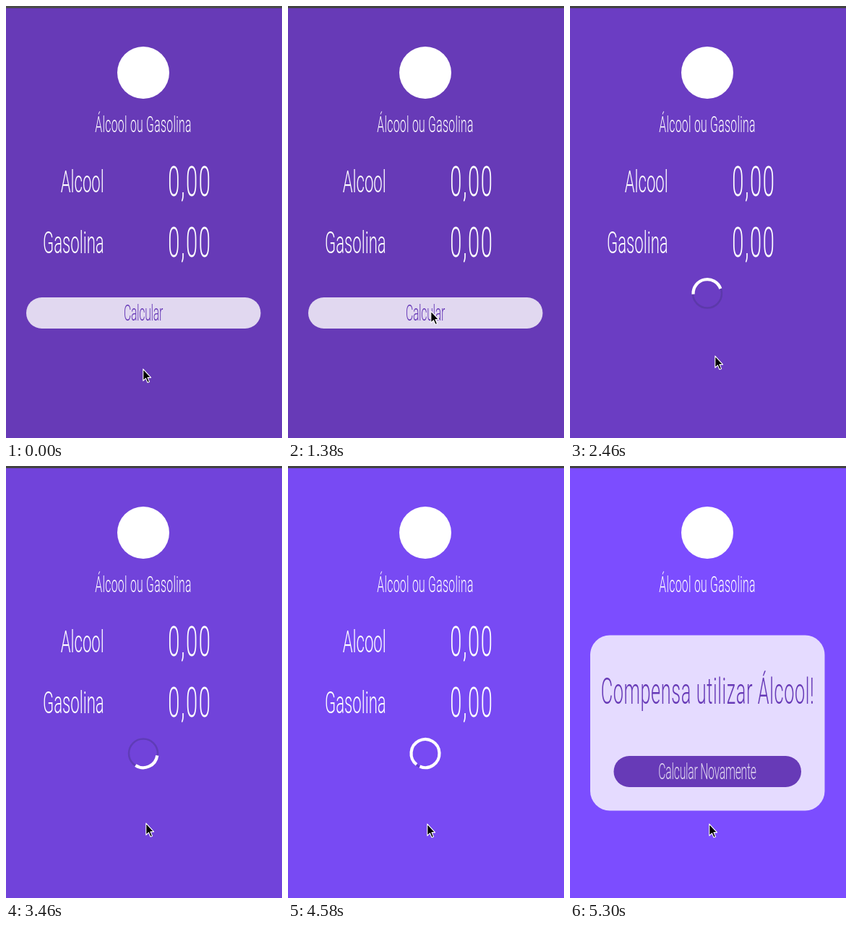
Animation, 382 px wide and 596 px high, one loop 8 s. Source, as an HTML page:

```html
<!DOCTYPE html>
<html lang="pt-BR">
<head>
<meta charset="utf-8">
<title>Álcool ou Gasolina</title>
<style>
  html, body { margin: 0; width: 100%; height: 100%; overflow: hidden; background: #673ab7; }
  svg { display: block; width: 382px; height: 596px; }
  text { font-family: Roboto, "Liberation Sans", sans-serif; font-weight: 300; fill: #fff; }
  .middle { text-anchor: middle; }
  .end { text-anchor: end; }
  .caption { font-size: 31px; letter-spacing: .55px; }
  .label { font-size: 43.4px; }
  .value { font-size: 57px; letter-spacing: 3px; }
  .heading { font-size: 49.6px; letter-spacing: 1.2px; }
  .button { font-size: 31px; letter-spacing: -.55px; }
  .purple { fill: #673ab7; }
  .veil { fill: #fff; fill-opacity: .8; }
</style>
</head>
<body>
<svg viewBox="0 0 382 596">
  <rect id="back" width="382" height="596"/>
  <rect width="382" height="3" fill="#424242"/>
  <path id="dots" d="M0 1.5H382" stroke="#666" stroke-dasharray="1 1"/>

  <circle cx="190" cy="92" r="36" fill="#fff"/>
  <g id="header"></g>

  <g id="form"></g>
  <g id="submit">
    <rect class="veil" x="28" y="402" width="324.5" height="43" rx="21.5"/>
  </g>

  <g id="spinner" fill="none" transform="translate(190 396.6)">
    <circle r="20" stroke="#4a348c" stroke-opacity=".45" stroke-width="2.5"/>
    <path id="arc" stroke="#fff" stroke-width="4.2"/>
  </g>

  <g id="result">
    <rect class="veil" x="28" y="233.5" width="324.5" height="242" rx="27"/>
    <rect class="purple" x="60.5" y="400" width="259.5" height="43" rx="21.5"/>
  </g>

  <path id="cursor" d="M.8 .9V17L4.5 13.6L7 19.5L9.5 18.4L7 12.6H11.6Z"
        fill="#000" stroke="#fff" stroke-width="1.1" stroke-linejoin="round"/>
</svg>

<script>
const LOOP = 8000;
const CLICK = 1780, ANSWER = 4720; // button pressed, result shown
const CONDENSE = 0.51; // one narrow face shared by all the text
const $ = id => document.getElementById(id);

function write(parent, text, style, x, y) {
  const el = document.createElementNS("http://www.w3.org/2000/svg", "text");
  el.setAttribute("class", style);
  el.setAttribute("transform", `translate(${x} ${y}) scale(${CONDENSE} 1)`);
  el.textContent = text;
  $(parent).append(el);
}

write("header", "Álcool ou Gasolina", "caption middle", 190, 173.7);
["Alcool", "Gasolina"].forEach((fuel, row) => {
  write("form", fuel, "label end", 135.7, 257 + 84 * row);
  write("form", "0,00", "value", 224.3, 261.5 + 84 * row);
});
write("submit", "Calcular", "button middle purple", 190, 433.5);
write("result", "Compensa utilizar Álcool!", "heading middle purple", 190.5, 327.5);
write("result", "Calcular Novamente", "button middle veil", 190, 431.5);

const mix = (a, b, k) => a + (b - a) * k;
const blend = (from, to, k) => from.map((v, i) => mix(v, to[i], k));
const progress = (t, begin, end) => Math.min(1, Math.max(0, (t - begin) / (end - begin)));
const easeOut = k => 1 - (1 - k) ** 2;

// Each move takes the value on from wherever the last one left it.
const follow = (start, moves, t) => moves.reduce(
  (value, { begin, end, to, ease = k => k }) => blend(value, to, ease(progress(t, begin, end))),
  start);

const pointerMoves = [
  { begin: 499, end: 500, to: [198, 449] },
  { begin: 900, end: 1240, to: [197, 420] },
  { begin: CLICK, end: 2200, to: [200, 482] },
  { begin: 2460, end: 3860, to: [192, 493], ease: easeOut },
];

// start angle and sweep, in degrees
const arcMoves = [
  { begin: CLICK, end: 2460, to: [177, 163] },
  { begin: 2460, end: 3460, to: [368, 115] },
  { begin: 3460, end: 4580, to: [488, 345] },
];

function arcPath([start, sweep], r = 19.5) {
  const point = deg => {
    const a = deg * Math.PI / 180;
    return `${r * Math.cos(a)} ${r * Math.sin(a)}`;
  };
  return `M${point(start)}A${r} ${r} 0 ${sweep > 180 ? 1 : 0} 1 ${point(start + sweep)}`;
}

const show = (id, on) => { $(id).style.display = on ? "" : "none"; };

function render(t) {
  const color = blend([103, 58, 183], [124, 77, 255], progress(t, 1920, 5120));
  const [x, y] = follow([189, 500], pointerMoves, t).map(Math.round);
  $("back").setAttribute("fill", `rgb(${color.map(Math.round)})`);
  $("cursor").setAttribute("transform", `translate(${x} ${y})`);
  $("arc").setAttribute("d", arcPath(follow([-90, 5], arcMoves, t)));
  show("dots", t < 1380);
  show("submit", t < CLICK);
  show("spinner", t >= CLICK && t < ANSWER);
  show("form", t < ANSWER);
  show("result", t >= ANSWER);
}

const began = performance.now();
function frame() {
  render((performance.now() - began) % LOOP);
  requestAnimationFrame(frame);
}
frame();
</script>
</body>
</html>
```
